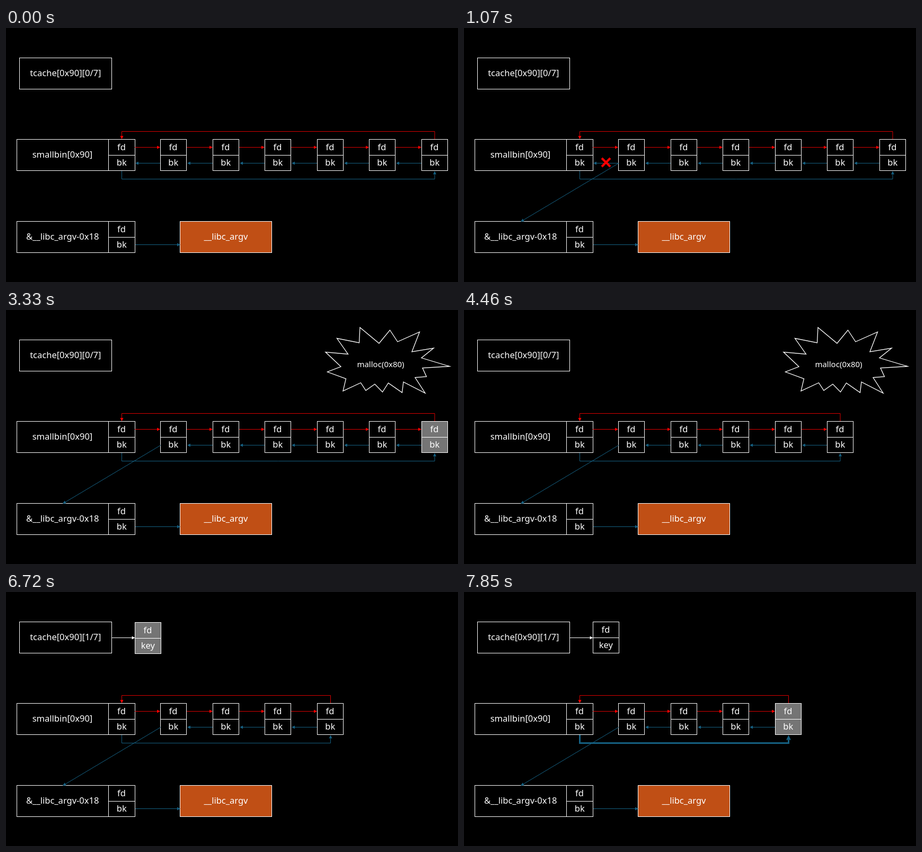
Recreate the animation shown at these times as an HTML page with a canvas. Size 853x480 px, loop 8000 ms.

```html
<!DOCTYPE html>
<html lang="en">
<head>
<meta charset="utf-8">
<title>Bin lists</title>
<style>
html, body { margin: 0; width: 100%; height: 100%; overflow: hidden; background: #000; }
canvas { display: block; }
</style>
</head>
<body>
<canvas id="stage" width="853" height="480"></canvas>
<script>
const ctx = document.getElementById('stage').getContext('2d');
const LOOP = 8000;
const RED = '#ff0000', BLUE = '#156082', WHITE = '#ffffff', GRAY = '#757575', ORANGE = '#c04f15';
const TOP = 210, HEAD_X = 193;

// count: chunks in the list; gray: last chunk highlighted; thick: bold bottom link
const steps = [
  { at: 0, count: 6 },
  { at: 1070, count: 6, diagonal: true, cross: true },
  { at: 2200, count: 6, diagonal: true },
  { at: 3330, count: 6, diagonal: true, burst: true, gray: true },
  { at: 4460, count: 5, diagonal: true, burst: true },
  { at: 5590, count: 5, diagonal: true, gray: true, thick: true },
  { at: 6720, count: 4, diagonal: true, cached: 'gray' },
  { at: 7850, count: 4, diagonal: true, gray: true, thick: true, cached: 'plain' }
];

const burstPoints = [
  [668, 33], [704, 63], [724.5, 38], [739, 60], [780.5, 41.5], [766, 79], [807, 72],
  [784, 90.5], [837, 106.5], [786, 109.5], [793.5, 126], [772, 127.5], [791, 157], [750, 136],
  [747.5, 156], [721.5, 138], [710.5, 155], [696, 140], [679, 152], [669.5, 137.5], [636, 153],
  [641.5, 130], [606.5, 117], [632, 107], [603, 79.5], [645.5, 83.5], [624.5, 53.5], [666.5, 62]
];

function label(text, x, baseline, size = 16.5) {
  ctx.font = size + 'px "Noto Sans", "Open Sans", sans-serif';
  ctx.textAlign = 'center';
  ctx.fillStyle = WHITE;
  ctx.fillText(text, x, baseline);
}

function box(x, y, w, h, fill = '#000') {
  ctx.fillStyle = fill;
  ctx.fillRect(x + 0.5, y + 0.5, w, h);
  ctx.strokeStyle = WHITE;
  ctx.lineWidth = 1;
  ctx.strokeRect(x + 0.5, y + 0.5, w, h);
}

function pair(x, y, second, fill, w = 49) {
  box(x, y, w, 30, fill);
  box(x, y + 30, w, 29, fill);
  label('fd', x + w / 2, y + 21);
  label(second, x + w / 2 + 0.3, y + 50);
}

function trace(points) {
  ctx.beginPath();
  points.forEach(([x, y]) => ctx.lineTo(x, y));
}

// Polyline with a filled head at its last point
function arrow(points, color, width = 1) {
  const head = width > 1 ? 9 : 6;
  const [tx, ty] = points[points.length - 1];
  const [px, py] = points[points.length - 2];
  const len = Math.hypot(tx - px, ty - py);
  const ux = (tx - px) / len, uy = (ty - py) / len;
  const bx = tx - ux * head, by = ty - uy * head, half = head / 2;

  ctx.lineWidth = width;
  ctx.strokeStyle = ctx.fillStyle = color;
  ctx.globalAlpha = color === RED ? 0.85 : 1;
  trace([...points.slice(0, -1), [bx, by]]);
  ctx.stroke();
  ctx.globalAlpha = 1;
  trace([[tx, ty], [bx - uy * half, by + ux * half], [bx + uy * half, by - ux * half]]);
  ctx.fill();
}

const chunkX = i => Math.round(HEAD_X + 98.45 * i);

function drawList(s) {
  box(20, TOP, 173, 59);
  pair(HEAD_X, TOP, 'bk', '#000', 50);
  label('smallbin[0x90]', 106.5, 245);

  for (let i = 1; i <= s.count; i++) {
    pair(chunkX(i), TOP, 'bk', s.gray && i === s.count ? GRAY : '#000');
  }
  for (let i = 1; i <= s.count; i++) {
    const left = chunkX(i - 1) + 50, right = chunkX(i);
    arrow([[left, 225.5], [right, 225.5]], RED);
    if (i > 1 || !s.diagonal || s.cross) arrow([[right, 255.5], [left + 1, 255.5]], BLUE);
  }

  const end = chunkX(s.count) + 25.5 - (s.count < 6 ? 0 : 0.5) + (s.count === 6 ? 0.5 : 0) - 0.0;
  const tail = Math.floor(end) - 0.5 + (s.count === 4 ? 1 : 0.5);
  arrow([[tail, 210], [tail, 195.5], [218.5, 195.5], [218.5, 210]], RED);
  arrow([[218.5, 270], [218.5, 285.5], [tail, 285.5], [tail, 270.5]], BLUE, s.thick ? 3 : 1);
}

function drawCache(state) {
  box(25, 56, 174, 59);
  label(`tcache[0x90][${state ? 1 : 0}/7]`, 112.3, 91);
  if (!state) return;
  const gray = state === 'gray';
  pair(243, gray ? 57 : 56, 'key', gray ? GRAY : '#000');
  arrow([[200, 86.5], [243.5, 86.5]], WHITE);
}

function drawTarget() {
  box(20, 365, 173, 59);
  pair(HEAD_X, 365, 'bk', '#000', 50);
  label('&__libc_argv-0x18', 106.7, 400);
  box(328, 365, 173, 59, ORANGE);
  label('__libc_argv', 415, 400);
  arrow([[244, 409.5], [329, 409.5]], BLUE);
}

function drawCross() {
  ctx.strokeStyle = RED;
  ctx.lineWidth = 4;
  trace([[260, 246], [276, 262]]);
  ctx.stroke();
  trace([[276, 246], [260, 262]]);
  ctx.stroke();
}

function drawBurst() {
  trace(burstPoints);
  ctx.closePath();
  ctx.strokeStyle = WHITE;
  ctx.lineWidth = 1.3;
  ctx.stroke();
  label('malloc(0x80)', 707, 108, 15);
}

function render(t) {
  const s = steps.filter(step => step.at <= t).pop();
  ctx.fillStyle = '#000';
  ctx.fillRect(0, 0, 853, 480);
  drawCache(s.cached);
  drawList(s);
  drawTarget();
  if (s.diagonal) arrow([[292, 255.5], [107, 366]], BLUE);
  if (s.cross) drawCross();
  if (s.burst) drawBurst();
}

const start = performance.now();
function tick() {
  render((performance.now() - start) % LOOP);
  requestAnimationFrame(tick);
}
tick();
</script>
</body>
</html>
```
